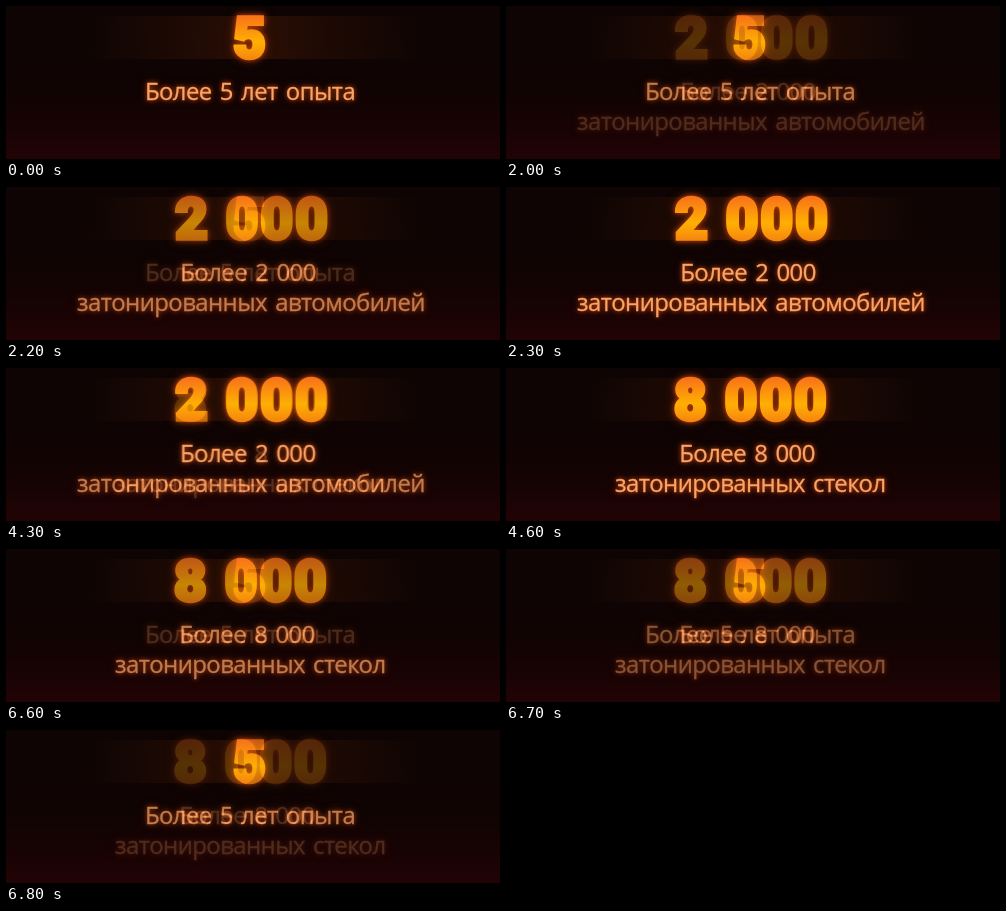
An HTML page for the animation above (6900 ms loop, 494 by 153 pixels).

```html
<!DOCTYPE html>
<html lang="ru">
<head>
<meta charset="utf-8">
<title>Более 5 лет опыта</title>
<style>
  html, body {
    margin: 0;
    width: 100%;
    height: 100%;
    overflow: hidden;
    background: #0b0303;
  }
  svg { display: block; width: 494px; height: 153px; }

  .number {
    font: 900 57px Roboto, "Liberation Sans", sans-serif;
    letter-spacing: 1.7px;
    text-anchor: middle;
    fill: url(#fire);
    stroke: url(#fire);
    stroke-width: 3.5;
    filter: drop-shadow(0 0 2.5px #d85008cc) drop-shadow(0 0 4px #a8300088);
  }
  .caption {
    font: 400 23.9px "Open Sans", "Noto Sans", sans-serif;
    letter-spacing: -.55px;
    word-spacing: 2.5px;
    text-anchor: middle;
    fill: #faa468;
    stroke: #faa468;
    stroke-width: .3;
    filter: drop-shadow(0 0 2px #c84c08cc) drop-shadow(0 0 3px #90280088);
  }

  /* Each slide holds for 2 s, then dissolves in hard 100 ms steps.
     Adding the two weighted slides keeps shared areas at full strength. */
  .slides { isolation: isolate; }
  .slide {
    opacity: 0;
    mix-blend-mode: plus-lighter;
    animation: 6900ms step-end infinite;
  }
  .years { animation-name: years; }
  .cars { animation-name: cars; }
  .windows { animation-name: windows; }

  @keyframes years {
    0% { opacity: 1; }
    28.985% { opacity: .75; }
    30.434% { opacity: .5; }
    31.884% { opacity: .25; }
    33.333% { opacity: 0; }
    95.652% { opacity: .25; }
    97.101% { opacity: .5; }
    98.55% { opacity: .75; }
    100% { opacity: 1; }
  }
  @keyframes cars {
    0% { opacity: 0; }
    28.985% { opacity: .25; }
    30.434% { opacity: .5; }
    31.884% { opacity: .75; }
    33.333% { opacity: 1; }
    62.318% { opacity: .75; }
    63.768% { opacity: .5; }
    65.217% { opacity: .25; }
    66.666%, 100% { opacity: 0; }
  }
  @keyframes windows {
    0% { opacity: 0; }
    62.318% { opacity: .25; }
    63.768% { opacity: .5; }
    65.217% { opacity: .75; }
    66.666% { opacity: 1; }
    95.652% { opacity: .75; }
    97.101% { opacity: .5; }
    98.55% { opacity: .25; }
    100% { opacity: 0; }
  }
</style>
</head>
<body>
<svg viewBox="0 0 494 153">
  <defs>
    <linearGradient id="night" x2="0" y2="1">
      <stop offset="0" stop-color="#0d0403"/>
      <stop offset=".5" stop-color="#0f0403"/>
      <stop offset=".78" stop-color="#170304"/>
      <stop offset="1" stop-color="#220305"/>
    </linearGradient>
    <linearGradient id="band">
      <stop offset="0" stop-color="#3a1406" stop-opacity="0"/>
      <stop offset=".2" stop-color="#3a1406" stop-opacity=".25"/>
      <stop offset=".5" stop-color="#4a1a06" stop-opacity=".5"/>
      <stop offset=".8" stop-color="#3a1406" stop-opacity=".25"/>
      <stop offset="1" stop-color="#3a1406" stop-opacity="0"/>
    </linearGradient>
    <linearGradient id="fire" gradientUnits="userSpaceOnUse" x1="0" y1="9" x2="0" y2="54">
      <stop offset="0" stop-color="#f8701a"/>
      <stop offset=".6" stop-color="#ffb002"/>
      <stop offset="1" stop-color="#f58410"/>
    </linearGradient>
  </defs>

  <rect width="494" height="153" fill="url(#night)"/>
  <rect x="75" y="10" width="345" height="43" fill="url(#band)"/>

  <g class="slides">
    <g class="slide years">
      <text class="number" x="244.4" y="51.8">5</text>
      <text class="caption" x="244" y="94">Более 5 лет опыта</text>
    </g>
    <g class="slide cars">
      <text class="number" x="246.4" y="51.8">2 000</text>
      <text class="caption" x="242" y="94">Более 2 000</text>
      <text class="caption" x="245" y="124">затонированных автомобилей</text>
    </g>
    <g class="slide windows">
      <text class="number" x="245.2" y="51.8">8 000</text>
      <text class="caption" x="241" y="94">Более 8 000</text>
      <text class="caption" x="244.3" y="124">затонированных стекол</text>
    </g>
  </g>
</svg>
</body>
</html>
```
